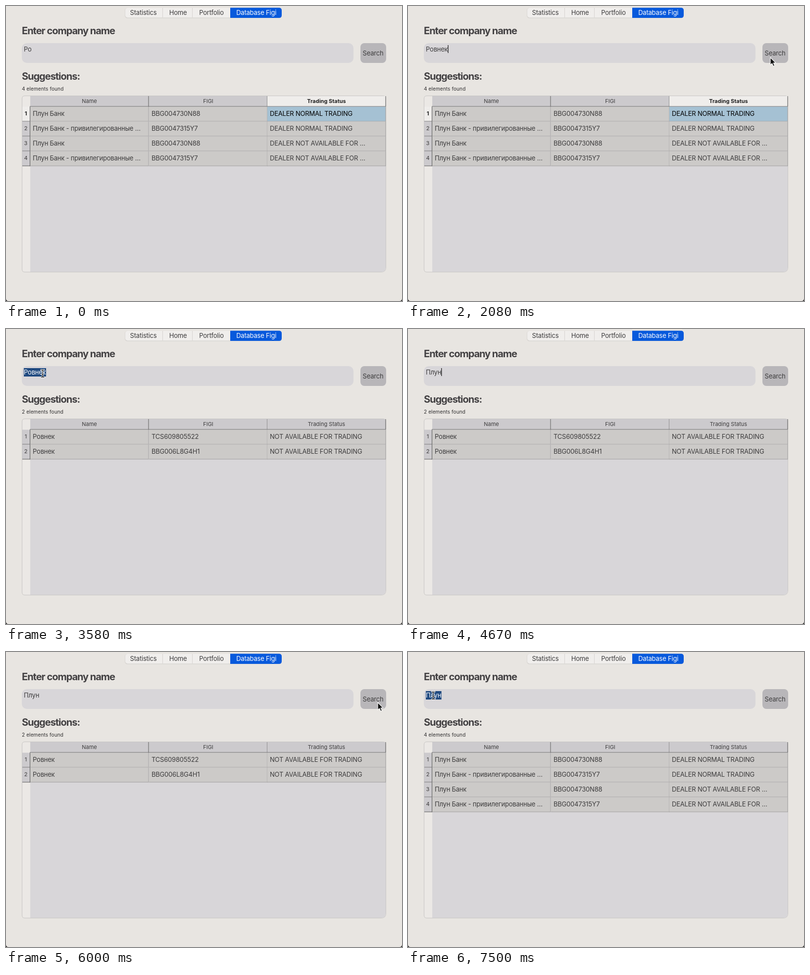
Animation, 800 px wide and 596 px high, one loop 8 s. Source, as an HTML page:

```html
<!DOCTYPE html>
<html lang="en">
<head>
<meta charset="utf-8">
<title>Company search</title>
<style>
  html, body { margin: 0; width: 100%; height: 100%; overflow: hidden; background: #e8e5e1; }
  svg { display: block; width: 100vw; height: 100vh; }
  text { font: 13px Inter, "Open Sans", sans-serif; letter-spacing: -.2px; fill: #3d3c3d; white-space: pre; }
  .title { font-size: 20px; font-weight: 700; letter-spacing: -1.02px; fill: #434143; }
  .small { font-size: 11px; letter-spacing: 0; }
  .count { font-size: 10px; letter-spacing: .12px; fill: #2f2e2f; }
  .mid { text-anchor: middle; }
  .bold { font-weight: 700; fill: #222; }
</style>
</head>
<body>
<svg viewBox="0 0 800 596">
  <path d="M0 591V596H5Q0 596 0 591M800 591V596H795Q800 596 800 591" fill="#111"/>
  <g id="tabs"></g>
  <text class="title" x="32" y="56.5">Enter company name</text>
  <rect x="32" y="75" width="670" height="40" rx="10" fill="#d8d6d9"/>
  <rect x="716" y="75" width="52" height="40" rx="8" fill="#b8b6b9"/>
  <text class="mid" x="741.5" y="100.3">Search</text>
  <rect id="selection" y="79" x="36" height="17" fill="#204a80"/>
  <text id="query" x="36" y="91.7"></text>
  <rect id="caret" y="79" width="1.2" height="16" fill="#111"/>
  <text class="title" x="32" y="148.5">Suggestions:</text>
  <text id="count" class="count" x="32" y="171.3"></text>
  <g id="table"></g>
  <path id="arrow" d="M0 0V15.2L3.5 12L6 17.7L8.6 16.6L6.2 11.1H11Z" fill="#111" stroke="#fff" stroke-width="1.1" stroke-linejoin="round"/>
  <g id="beam" fill="none" stroke-linecap="round">
    <path d="M-3 -7.5Q0 -7.5 0 -5.5Q0 -7.5 3 -7.5M0 -5.5V5.5M-3 7.5Q0 7.5 0 5.5Q0 7.5 3 7.5M-1.5 2H1.5" stroke="#fff" stroke-width="2.8"/>
    <path d="M-3 -7.5Q0 -7.5 0 -5.5Q0 -7.5 3 -7.5M0 -5.5V5.5M-3 7.5Q0 7.5 0 5.5Q0 7.5 3 7.5M-1.5 2H1.5" stroke="#111" stroke-width="1.2"/>
  </g>
</svg>
<script>
const TICKS_PER_SECOND = 12, LOOP_MS = 8000;
const FIRM = 'Ровнек', BANK = 'Плун';
const $ = id => document.getElementById(id);

const rect = (x, y, w, h, fill, extra = '') =>
  `<rect x="${x}" y="${y}" width="${w}" height="${h}" fill="${fill}" ${extra}/>`;
const label = (x, y, text, cls = '', extra = '') =>
  `<text x="${x}" y="${y}" class="${cls}" ${extra}>${text}</text>`;

$('tabs').innerHTML =
  rect(240, 4, 317, 20.5, '#d2cfcc', 'rx="5.5"') +
  rect(240.7, 4, 315.6, 19.5, '#f0eeec', 'rx="5"') +
  rect(316, 4, 1, 19.5, '#d6d3d1') + rect(376, 4, 1, 19.5, '#d6d3d1') +
  '<path d="M453 3.5H551.5Q557 3.5 557 9V18.5Q557 24 551.5 24H453Z" fill="#0759dc"/>' +
  label(277.5, 18.4, 'Statistics', 'mid') + label(347.5, 18.4, 'Home', 'mid') +
  label(415, 18.4, 'Portfolio', 'mid') +
  label(505.7, 18.4, 'Database Figi', 'mid', 'style="fill:#fff"');

const columns = [[49, 'Name'], [289, 'FIGI'], [528, 'Trading Status']];
const firmRows = ['TCS609805522', 'BBG006L8G4H1'].map(
  figi => [FIRM, figi, 'NOT AVAILABLE FOR TRADING']);
const bankRows = ['DEALER NORMAL TRADING', 'DEALER NOT AVAILABLE FOR …'].flatMap(status => [
  [`${BANK} Банк`, 'BBG004730N88', status],
  [`${BANK} Банк - привилегированные …`, 'BBG0047315Y7', status]]);

function tableMarkup(rows, selected) {
  const dark = '#5b5a5b', grid = '#a3a2a2';
  let out = '<path d="M32.5 187Q32.5 181.5 38 181.5H762Q767.5 181.5 767.5 187V528Q767.5 537.5 758 537.5H38Q32.5 537.5 32.5 532Z" fill="#ebe8e5" stroke="#c9c7c6"/>' +
    '<path d="M49 182H767V528Q767 537 758 537H49Z" fill="#d8d6d9"/>';
  columns.forEach(([x, name], i) => {
    const active = selected && i === 2;
    out += rect(x, 182, 239, 21, active ? '#efedeb' : '#cccacd') +
      rect(x + 238.5, 182, 1, 21, dark) +
      label(x + 119.5, 195.8, name, 'small mid' + (active ? ' bold' : ''));
  });
  out += rect(48, 202.5, 719, 1, dark);
  rows.forEach((row, r) => {
    const y = 203.5 + r * 30, active = selected && r === 0;
    out += rect(33, y, 15, 29.5, active ? '#efedeb' : '#cccacd') +
      rect(33, y + 29, 16, 1, dark) + rect(48, y, 1, 30, dark) +
      label(40, y + 17.7, r + 1, 'small mid' + (active ? ' bold' : ''));
    row.forEach((text, c) => {
      const x = columns[c][0], chosen = active && c === 2;
      out += rect(x, y, 239, 29.5, chosen ? '#a5c1d3' : '#cccac8') +
        rect(x, y + 29, 239, 1, grid) + rect(x + 238.5, y, 1, 30, grid) +
        label(x + 5, y + 18.2, text, '', chosen ? 'style="fill:#000"' : '');
    });
  });
  return out;
}

// Tick at which the field's text takes each value.
const typing = [
  [0, FIRM.slice(0, 2)], [4, FIRM.slice(0, 3)], [6, FIRM.slice(0, 4)],
  [8, FIRM.slice(0, 5)], [12, FIRM],
  [49, BANK.slice(0, 1)], [53, BANK.slice(0, 2)], [55, BANK.slice(0, 3)], [56, BANK]];
const results = [[0, bankRows, true], [27, firmRows, false], [74, bankRows, false]];
const caretSpans = [[4, 18], [24, 30], [36, 42], [49, 61], [67, 72], [78, 84]];
const selectionSpans = [[42, 49], [86, 96]];
const pointerSpans = [[15, 49], [61, 96]];
const pointerPath = [
  [15, 98, 88], [24, 729, 103], [25, 732, 104], [28, 732, 104], [34, 155, 35],
  [38, 75, 72], [41, 74, 90], [61, 74, 90], [70, 751, 105], [72, 751, 102],
  [76, 751, 102], [84, 52, 88], [86, 51, 88], [96, 51, 88]];

const during = (spans, tick) => spans.some(([from, to]) => tick >= from && tick < to);
const latest = (list, tick) => list.filter(([from]) => from <= tick).pop();
const show = (id, visible) => { $(id).style.display = visible ? '' : 'none'; };

function pointerAt(tick) {
  const next = pointerPath.findIndex(([at]) => at > tick);
  if (next < 1) return pointerPath[0].slice(1);
  const [t0, x0, y0] = pointerPath[next - 1], [t1, x1, y1] = pointerPath[next];
  const p = (tick - t0) / (t1 - t0), ease = p * p * (3 - 2 * p);
  return [x0 + (x1 - x0) * ease, y0 + (y1 - y0) * ease];
}

let shownResult;
function render(ms) {
  const tick = Math.floor((ms % LOOP_MS + 4) * TICKS_PER_SECOND / 1000) % 96;

  const result = latest(results, tick);
  if (result !== shownResult) {
    shownResult = result;
    $('table').innerHTML = tableMarkup(result[1], result[2]);
    $('count').textContent = `${result[1].length} elements found`;
  }

  const selected = during(selectionSpans, tick);
  const query = $('query');
  query.textContent = latest(typing, tick)[1];
  query.style.fill = selected ? '#fff' : '';
  const width = query.getComputedTextLength();
  $('selection').setAttribute('width', width + .5);
  $('caret').setAttribute('x', 36 + width);
  show('selection', selected);
  show('caret', during(caretSpans, tick));

  const [x, y] = pointerAt(tick);
  const visible = during(pointerSpans, tick);
  const inField = x > 32 && x < 702 && y > 75 && y < 115;
  for (const id of ['arrow', 'beam']) {
    $(id).setAttribute('transform', `translate(${x} ${y})`);
    show(id, visible && inField === (id === 'beam'));
  }
}

const start = performance.now();
function loop(now) {
  render(Math.max(0, now - start));
  requestAnimationFrame(loop);
}
render(0);
requestAnimationFrame(loop);
</script>
</body>
</html>
```
